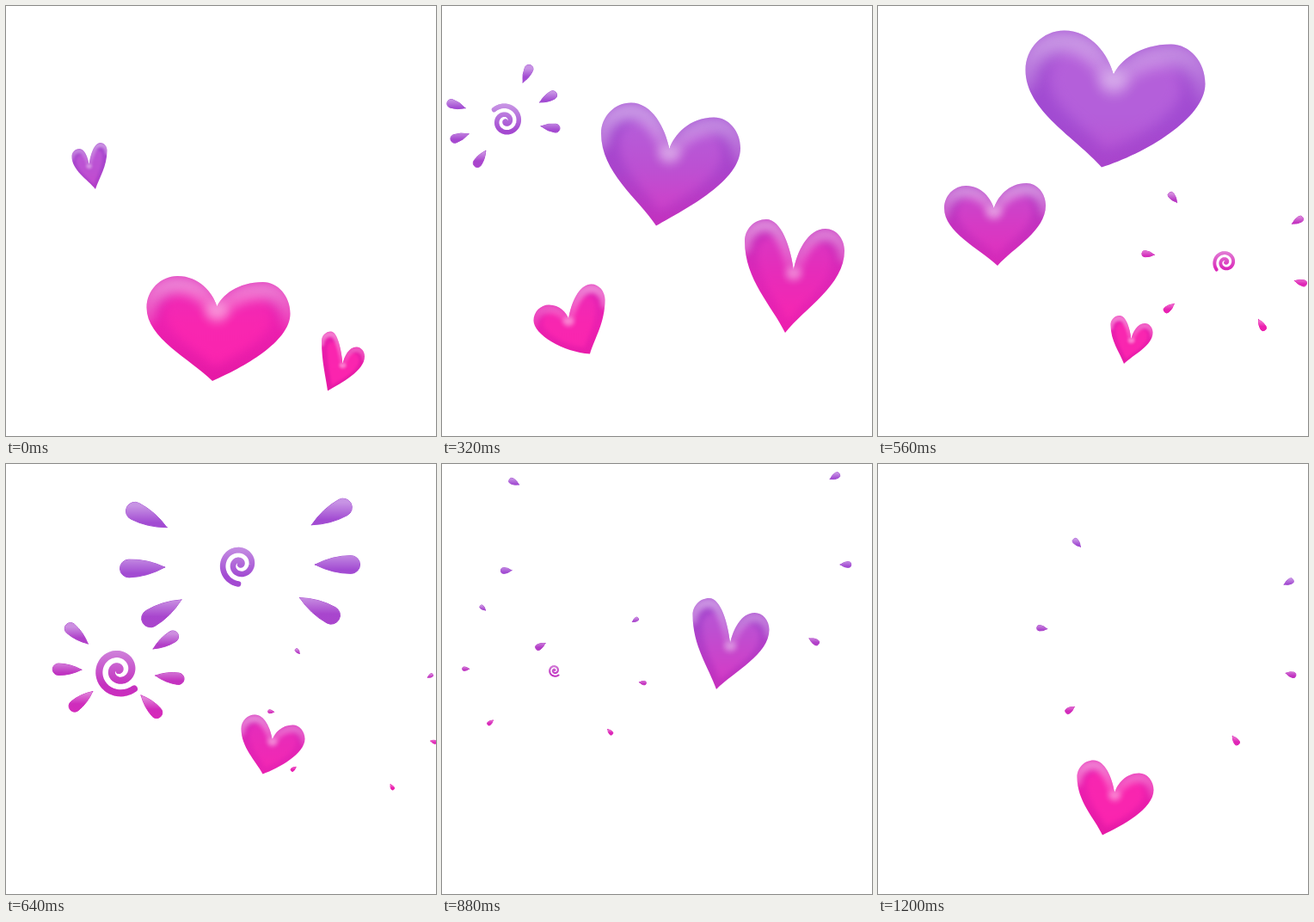
These frames come from a looping animation (500x500 px, 1280 ms). An HTML page with a canvas:

```html
<!DOCTYPE html>
<html>
<head>
<meta charset="utf-8">
<style>
html, body { margin: 0; width: 100%; height: 100%; overflow: hidden; background: #fff; }
canvas { display: block; }
</style>
</head>
<body>
<canvas id="c" width="500" height="500"></canvas>
<script>
const ctx = document.getElementById('c').getContext('2d');
const STEP = 80, STEPS = 16, RAD = Math.PI / 180;
const clamp = (v, lo, hi) => Math.min(hi, Math.max(lo, v));

// Key poses: step after birth, centre x, y, width, height, lean of the tip.
// Bursts: r and speed of the ring, len of a drop, curl of the swirl, and the
// directions in which the left and right fans of drops fly.
const bubbles = [
  { born: 14,
    poses: [[0, 260,434, 45,44, -4], [1, 276,388, 89,87, -15], [2, 247,375, 167,122, -7],
            [4, 263,248, 141,120, -12], [6, 266,184, 162,143, -17], [9, 276,108, 209,159, -16]],
    burst: { from: 8, to: 11, x: 272, y: 117, r: 141, speed: 28, len: 40, curl: 17, turn: 95, left: 178, right: 0, spread: 29 } },
  { born: 0,
    poses: [[0, 97,186, 41,54, 7], [2, 81,148, 73,65, 14]],
    burst: { from: 3, to: 6, x: 74, y: 134, r: 56, speed: 5, len: 23, curl: 19, turn: 225, left: 161, right: -29, spread: 37 } },
  { born: 0,
    poses: [[0, 392,413, 50,69, -18], [2, 400,360, 98,91, -9], [4, 410,314, 116,132, -11]],
    burst: { from: 5, to: 8, x: 404, y: 298, r: 84, speed: 6, len: 23, curl: 20, turn: 140, left: 186, right: 15, spread: 45 } },
  { born: 2,
    poses: [[0, 180,436, 48,58, 17], [2, 148,364, 83,81, 24], [5, 136,254, 118,96, 3]],
    burst: { from: 8, to: 12, x: 131, y: 240, r: 74, speed: 14.5, len: 26, curl: 21, turn: 50, left: 181, right: 8, spread: 40 } },
  { born: 7,
    poses: [[0, 295,388, 49,56, -9], [2, 326,264, 99,82, -15], [4, 336,209, 89,106, -17]],
    burst: { from: 12, to: 15, x: 337, y: 209, r: 97, speed: 25, len: 38, curl: 20, turn: 90, left: 187, right: 14, spread: 41 } }
];

// Colour depends on the height on the stage.
function tint(...colors) {
  const g = ctx.createLinearGradient(0, 0, 0, 500);
  colors.forEach((c, i) => g.addColorStop(.26 + i * .12, c));
  return g;
}
const outer = tint('#a24bd2', '#aa44cc', '#c232c0', '#dc27b8', '#ec20b0', '#e61aa6');
const inner = tint('#b45fda', '#bc50d2', '#d43cc6', '#e62cba', '#f826b0', '#fb24ae');

function gloss(top, bottom, alpha) {
  const g = ctx.createLinearGradient(0, top, 0, bottom);
  g.addColorStop(0, `rgba(255,255,255,${alpha})`);
  g.addColorStop(1, 'rgba(255,255,255,0)');
  return g;
}

function poseAt(poses, u) {
  const i = Math.max(1, poses.findIndex(p => p[0] >= u));
  const a = poses[i - 1], b = poses[i], k = (u - a[0]) / (b[0] - a[0]);
  return a.slice(1).map((v, j) => v + (b[j + 1] - v) * k);
}

function heart([x, y, w, h, lean]) {
  const L = x - w / 2, R = x + w / 2, top = y - h / 2;
  const cx = x - w * .01, cy = top + Math.abs(lean) / 2 + h * clamp(.36 * h / w, .24, .42);
  const tx = x + lean, ty = y + h / 2;
  // The lobe on the side of the tip sits lower.
  const ay = top + Math.max(0, lean), by = top + Math.max(0, -lean);
  const ax = L + w * .215, bx = R - w * .19;
  const ly = ay + w * .22, ry = by + w * .22;

  const lobes = new Path2D();
  lobes.moveTo(L, ly);
  lobes.bezierCurveTo(L, ly + (ay - ly) * .55, ax + (L - ax) * .55, ay, ax, ay);
  lobes.bezierCurveTo(ax + (cx - ax) * .55, ay, cx + (ax - cx) * .1, cy + (ay - cy) * .45, cx, cy);
  lobes.bezierCurveTo(cx + (bx - cx) * .1, cy + (by - cy) * .45, bx + (cx - bx) * .55, by, bx, by);
  lobes.bezierCurveTo(bx + (R - bx) * .55, by, R, ry + (by - ry) * .55, R, ry);

  // Flat sides bulge more than steep ones.
  const side = (ex, ey) => {
    const dx = ex - tx, dy = ty - ey, e = Math.abs(dx) / dy;
    return [ex, ey + dy * .42, tx + dx * (.33 + .2 * clamp(e - .87, 0, .7)), ty - dy * clamp(.74 - .47 * e, .05, .3)];
  };
  const [r1, r2, r3, r4] = side(R, ry), [l1, l2, l3, l4] = side(L, ly);
  const body = new Path2D(lobes);
  body.bezierCurveTo(r1, r2, r3, r4, tx, ty);
  body.bezierCurveTo(l3, l4, l1, l2, L, ly);
  body.closePath();

  ctx.save();
  ctx.fillStyle = outer;
  ctx.fill(body);
  ctx.clip(body);
  ctx.filter = `blur(${w * .035}px)`;

  const core = new Path2D(), my = cy + (ty - cy) * .25;
  core.addPath(body, new DOMMatrix().translate(x, my).scale(.74).translate(-x, -my));
  ctx.fillStyle = inner;
  ctx.fill(core);

  ctx.translate(0, w * .06);
  ctx.strokeStyle = gloss(top, cy + w * .18, .42);
  ctx.lineWidth = w * .13;
  ctx.stroke(lobes);

  ctx.fillStyle = 'rgba(255,255,255,.35)';
  ctx.beginPath();
  ctx.ellipse(cx, cy - w * .03, w * .08, w * .06, 0, 0, 7);
  ctx.fill();
  ctx.restore();
}

function drop(x, y, len, width, angle) {
  const h = len / 2, r = width / 2, shape = new Path2D(), p = new Path2D();
  shape.moveTo(1 - h, 0);
  shape.quadraticCurveTo(-h * .2, -r, h - r, -r);
  shape.arc(h - r, 0, r, -Math.PI / 2, Math.PI / 2);
  shape.quadraticCurveTo(-h * .2, r, 1 - h, 0);
  shape.closePath();
  p.addPath(shape, new DOMMatrix().translate(x, y).rotate(angle));
  ctx.lineWidth = 1;
  ctx.fillStyle = ctx.strokeStyle = outer;
  ctx.fill(p);
  ctx.stroke(p);
  ctx.fillStyle = gloss(y - r * 1.3, y + r * .6, .4);
  ctx.fill(p);
}

function swirl(x, y, r, turn) {
  const p = new Path2D();
  for (let k = 0; k <= 1; k += .01) {
    const a = (turn + k * 680) * RAD, d = r * (1 - k);
    p.lineTo(x + d * Math.cos(a), y + d * Math.sin(a));
  }
  ctx.lineWidth = r * .29;
  ctx.strokeStyle = outer;
  ctx.stroke(p);
  ctx.strokeStyle = gloss(y - r, y + r * .6, .4);
  ctx.stroke(p);
}

// Two fans of three drops fly apart and shrink around a curling swirl.
function burst({ from, to, x, y, r, speed, len, curl, turn, left, right, spread }, f) {
  const n = f - from - 1, scale = Math.max(.3, 1 - .33 * n);
  const size = len * scale, width = size * (.55 - .12 * scale);
  for (const [mid, sign] of [[left, -1], [right, 1]])
    for (const k of [-1, 0, 1]) {
      const angle = mid + sign * k * spread, d = (r + speed * n) * (1 - .07 * k);
      drop(x + d * Math.cos(angle * RAD), y + d * Math.sin(angle * RAD), size, width, angle);
    }
  if (f < to) swirl(x, y, curl * scale, turn);
}

function frame(now) {
  const f = Math.floor(now / STEP) % STEPS;
  ctx.clearRect(0, 0, 500, 500);
  ctx.lineCap = ctx.lineJoin = 'round';
  for (const { born, poses, burst: b } of bubbles) {
    const u = (f - born + STEPS) % STEPS;
    if (u <= poses[poses.length - 1][0]) heart(poseAt(poses, u));
    else if (f >= b.from && f <= b.to) burst(b, f);
  }
}

let start;
function tick(now) {
  start ??= now;
  frame(now - start);
  requestAnimationFrame(tick);
}
frame(0);
requestAnimationFrame(tick);
</script>
</body>
</html>
```
